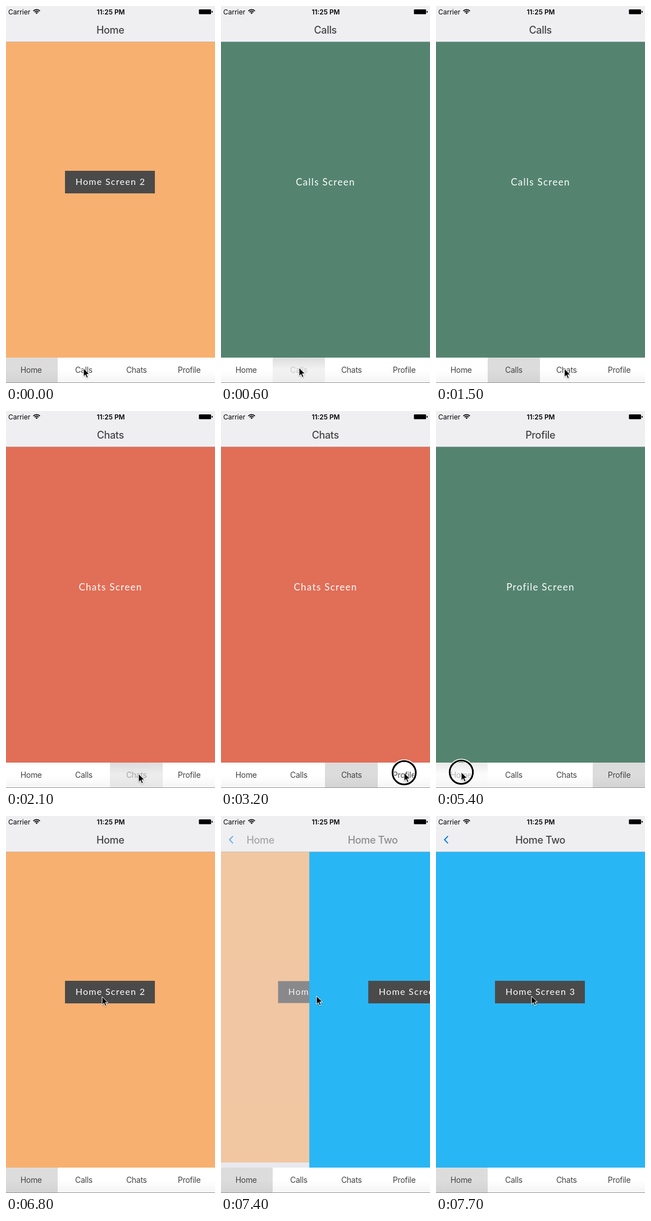
An HTML page that plays this animation: 372x668 px, repeating every 8 s.

```html
<!DOCTYPE html>
<html lang="en">
<head>
<meta charset="utf-8">
<title>Tab navigation</title>
<style>
  html, body { margin: 0; width: 100%; height: 100%; overflow: hidden; background: #fff; }
  svg { display: block; width: 372px; height: 668px; }
  text { text-anchor: middle; font-family: Inter, sans-serif; fill: #454547; }
  .status { font-size: 12px; fill: #000; text-anchor: start; }
  .clock { font-size: 11.8px; font-weight: 600; fill: #000; }
  .title { font-size: 18px; font-weight: 500; letter-spacing: -.02em; }
  .label { font-size: 14px; letter-spacing: -.02em; }
  .body, .btn text { font: 17px Lato, sans-serif; letter-spacing: 1.3px; fill: #fff; }
  .btn text { font-size: 16px; }
</style>
</head>
<body>
<svg viewBox="0 0 372 668">
  <defs>
    <linearGradient id="under" x2="0" y2="1">
      <stop stop-color="#dedede"/><stop offset=".45" stop-color="#fafafa"/><stop offset="1" stop-color="#fff"/>
    </linearGradient>
    <linearGradient id="shade" x2="0" y2="1">
      <stop offset=".5" stop-opacity="0"/><stop offset="1" stop-opacity=".04"/>
    </linearGradient>
    <filter id="soft" x="-50%" y="-50%" width="200%" height="200%">
      <feDropShadow dx="0" dy="1" stdDeviation="1" flood-opacity=".35"/>
    </filter>
  </defs>

  <rect width="372" height="668" fill="#e9e9ef"/>
  <g id="screens"></g>

  <rect width="372" height="63.5" fill="#efeff2"/>
  <rect y="63" width="372" height="1" fill="#828287" opacity=".3"/>
  <text class="status" x="4" y="14.5">Carrier</text>
  <g fill="none" stroke="#000" stroke-width="1.7">
    <path d="M48.6 8.8a8.2 8.2 0 0 1 11.8 0M50.8 11a5.2 5.2 0 0 1 7.4 0"/>
    <path d="M54.5 14.3l-2-2.1a2.9 2.9 0 0 1 4 0z" fill="#000" stroke="none"/>
  </g>
  <text class="clock" x="186.5" y="14.5">11:25 PM</text>
  <rect x="343.4" y="6" width="21.6" height="8.6" rx="1.4"/>
  <path d="M366 8.6q2 .3 2 1.7t-2 1.7z"/>
  <g id="titles"></g>
  <path id="back" d="M21.3 35.6L15.2 42l6.1 6.4" fill="none" stroke="#0b7cf0" stroke-width="2"/>

  <rect y="623" width="372" height="45" fill="url(#under)"/>
  <g id="tabs"></g>
  <rect y="623" width="372" height="44" fill="url(#shade)"/>
  <rect y="667" width="372" height="1" fill="#969696"/>

  <g id="pointer">
    <g id="ring" fill="none">
      <circle r="21" stroke="#fff" stroke-width="5.4"/>
      <circle r="20.7" stroke="#000" stroke-width="3"/>
    </g>
    <path d="M0 0V14.6L3.3 11.5 5.7 17 8.1 16 5.8 10.6H10.4Z" stroke="#fff" stroke-width="1" filter="url(#soft)"/>
  </g>
</svg>
<script>
const LOOP = 8000;
const $ = id => document.getElementById(id);
const show = (el, on) => el.setAttribute('visibility', on ? 'visible' : 'hidden');
const clamp = v => Math.min(1, Math.max(0, v));
const ease = p => p < .5 ? 2 * p * p : 1 - 2 * (1 - p) * (1 - p);
const ramp = (t, from, ms) => ease(clamp((t - from) / ms));

const TABS = ['Home', 'Calls', 'Chats', 'Profile'];
const EDGES = [0, 92, 185, 279, 372];
// title, colour, text, has button
const SCREENS = [
  ['Home', '#f7b06f', 'Home Screen 2', true],
  ['Calls', '#548470', 'Calls Screen'],
  ['Chats', '#e16e57', 'Chats Screen'],
  ['Profile', '#548470', 'Profile Screen'],
  ['Home Two', '#29b6f4', 'Home Screen 3', true]
];
// start, end, x, y
const MOVES = [
  [60, 100, 139, 641],
  [1050, 1610, 236, 643],
  [2400, 3000, 326, 641],
  [4230, 5150, 45, 640],
  [5950, 6750, 171, 320],
  [7150, 7400, 170, 319]
];
// down, up, tab
const TAPS = [[350, 550, 1], [1850, 2000, 2], [3200, 3400, 3], [5300, 5500, 0]];
const PUSH_TAP = [6900, 7080];
const PUSH = 7120, PUSH_MS = 520;

$('screens').innerHTML = SCREENS.map(([, color, text, button]) => `<g>
  <rect width="372" height="623" fill="${color}"/>
  ${button
    ? `<g class="btn"><rect x="105" y="292" width="160" height="40" fill="#4a4a4a"/><text x="186" y="317">${text}</text></g>`
    : `<text class="body" x="186" y="317.5">${text}</text>`}</g>`).join('');
$('titles').innerHTML = SCREENS.map(([title]) => `<text class="title" x="185.7" y="48.5">${title}</text>`).join('');
$('tabs').innerHTML = TABS.map((name, i) => `<g>
  <rect x="${EDGES[i]}" y="623" width="${EDGES[i + 1] - EDGES[i]}" height="44"/>
  <text class="label" x="${44.7 + 93.8 * i}" y="650">${name}</text></g>`).join('');

const screens = [...$('screens').children];
const titles = [...$('titles').children];
const tabs = [...$('tabs').children];
const homeButton = screens[0].querySelector('.btn');

const touchOpacity = (t, [down, up]) =>
  1 - .8 * (t < up ? ramp(t, down, 150) : 1 - ramp(t, up, 250));

function pointerAt(t) {
  let x = 138, y = 642;
  for (const [from, to, nx, ny] of MOVES) {
    const p = ramp(t, from, to - from);
    x += (nx - x) * p;
    y += (ny - y) * p;
  }
  return [x, y];
}

function draw(t) {
  let active = 0;
  for (const [, up, tab] of TAPS) if (t >= up + 40) active = tab;

  tabs.forEach((el, i) => {
    const tap = TAPS.find(p => p[2] === i);
    el.setAttribute('opacity', touchOpacity(t, tap));
    el.firstElementChild.setAttribute('fill', i === active ? '#dcdcdc' : '#fff');
  });

  const push = ramp(t, PUSH, PUSH_MS);
  const visible = i => i === 4 ? push > 0 : i === active && !(i === 0 && push === 1);
  screens.forEach((el, i) => show(el, visible(i)));
  titles.forEach((el, i) => show(el, visible(i)));

  const scale = 1 - .05 * push;
  screens[0].setAttribute('opacity', 1 - .7 * push);
  screens[0].setAttribute('transform',
    `translate(${186 - 10 * push} 311.5) scale(${scale}) translate(-186 -311.5)`);
  screens[4].setAttribute('transform', `translate(${372 * (1 - push)} 0)`);
  titles[0].setAttribute('opacity', 1 - push);
  titles[0].setAttribute('transform', `translate(${-200 * push} 0)`);
  titles[4].setAttribute('opacity', push);
  titles[4].setAttribute('transform', `translate(${200 * (1 - push)} 0)`);
  $('back').setAttribute('opacity', push);
  homeButton.setAttribute('opacity', touchOpacity(t, PUSH_TAP));

  $('pointer').setAttribute('transform', `translate(${pointerAt(t).join(' ')})`);
  show($('ring'), [...TAPS, PUSH_TAP].some(([down, up]) => t >= down && t < up));
}

const start = performance.now();
function tick() {
  draw((performance.now() - start) % LOOP);
  requestAnimationFrame(tick);
}
tick();
</script>
</body>
</html>
```
